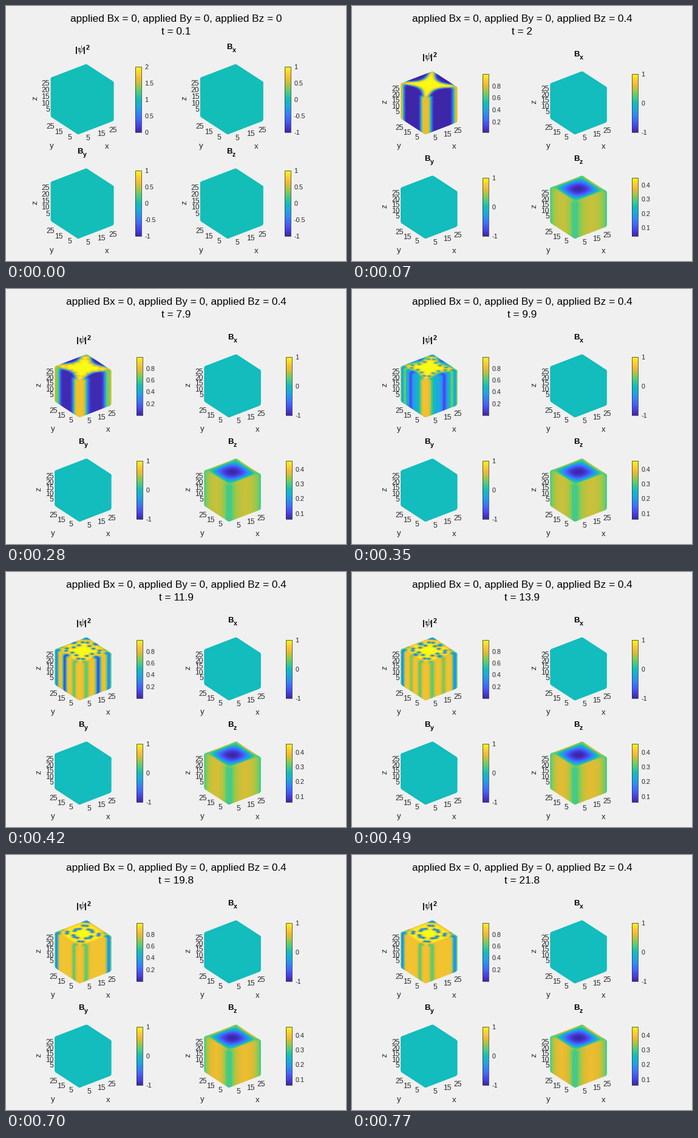
Write a matplotlib script that moves like this. It is 560x420 px and loops after 0.84 s.

```python
import numpy as np
import matplotlib.pyplot as plt
from matplotlib.animation import FuncAnimation
from matplotlib.colors import LinearSegmentedColormap
from matplotlib.patches import Rectangle

W, H, DPI = 560, 420, 100
PX = 72 / DPI
FRAMES, STEP_MS, DT = 12, 70, 1.98
N = 29  # lattice steps along each cube edge
COL, ROW = 246.2, 171.7
DOT = 8
INK = "#262626"

# blue, cyan, green, gold, yellow at even steps
CMAP = LinearSegmentedColormap.from_list("cube", [
    (.242, .150, .660), (.279, .263, .897), (.264, .403, .993),
    (.177, .548, .954), (.108, .667, .873), (.070, .746, .726),
    (.282, .796, .526), (.567, .794, .300), (.918, .731, .190),
    (.991, .806, .193), (.977, .984, .081)])

# the three visible faces of the cube, far points first
u, v = (g.ravel() for g in np.meshgrid(np.arange(N + 1.), np.arange(N + 1.)))
X = np.r_[0 * u, u, u]
Y = np.r_[u, 0 * u, v]
Z = np.r_[v, v, 0 * u + N]

# view axes for azimuth -37.5 and elevation 30 degrees
CA, SA = np.cos(np.radians(37.5)), np.sin(np.radians(37.5))
CE, SE = np.cos(np.radians(30)), np.sin(np.radians(30))
order = np.argsort(SE * Z - CE * (SA * X + CA * Y), kind="stable")
X, Y, Z = X[order], Y[order], Z[order]
VIEW_X = CA * X - SA * Y
VIEW_Y = SE * (SA * X + CA * Y) + CE * Z

# position along each edge and depth from it
SIDES = [(Y, X), (X, Y), (Y, N - X), (X, N - Y)]
NEAR_X, NEAR_Y = np.minimum(X, N - X), np.minimum(Y, N - Y)
EDGE, CORNER = np.minimum(NEAR_X, NEAR_Y), np.hypot(NEAR_X, NEAR_Y)


def ramp(t, a, b):
    f = np.clip((t - a) / (b - a), 0, 1)
    return f * f * (3 - 2 * f)


def vortices(t):
    """Place along the edge, depth, strength and spread of each vortex."""
    drift = .75 + .25 * ramp(t, 8, 17)
    for s in np.linspace(.23, .77, 4):
        yield s, drift * (2.5 + 5 * np.sin(np.pi * s) ** 2), .93 * ramp(t, 6.5, 11.5), 2.2
    late = ramp(t, 6, 11.5)
    yield .16, 0, .28 * late, 5
    yield .57 - .07 * ramp(t, 12, 17), 6 * ramp(t, 11.5, 17), .9 * late, 5 - 2.5 * ramp(t, 12, 17)
    yield .93, 0, .7 * late, 4


def density(t):
    """Superconducting density: edge lenses that break into vortices."""
    psi = 1 - .16 * np.exp(-EDGE / 1.5)
    lens = 1 - ramp(t, 8, 12)
    offset = 3 + 1.9 * ramp(t, 4, 9)
    for along, depth in SIDES:
        reach = 8.3 * np.sin(np.pi * along / N) - offset
        psi *= 1 - lens * .5 * (1 + np.tanh((reach - depth) / 1.5))
        for s, n, power, spread in vortices(t):
            r2 = (along - N * s) ** 2 + (depth - n) ** 2
            psi *= 1 - power * np.exp(-r2 / spread)
    return np.clip(psi, .02, 1)


def field_z(t):
    """Screened field on a 0..1 colour scale, weaker at the corners."""
    lam = .19
    c0 = 1 / np.cosh(.5 / lam)
    cx, cy = (np.cosh((q / N - .5) / lam) * c0 for q in (X, Y))
    low = 2 * c0 - c0 * c0
    shape = (cx + cy - cx * cy - low) / (1 - low)
    top = .765 + .05 * ramp(t, 8, 18)
    return shape * (top - (top - .59) * np.exp(-CORNER / 4))


def put(x, y, text, size, ha="left", rise=.358, **kw):
    """Text whose capitals are centred on y."""
    style = dict(color=INK, family="Liberation Sans") | kw
    ax.text(x, y + rise * size, text, fontsize=size * PX, ha=ha,
            va="baseline", **style)


def cube(x, y, s, level):
    ax.scatter(x + s * VIEW_X, y - s * VIEW_Y, s=(DOT * PX) ** 2,
               c=CMAP(level), linewidths=0)


def rulers(x, y, s):
    left = x - SA * N * s
    for n in range(5, 30, 5):
        put(left - 5.5, y - (11.2 + .908 * n) * s, n, 12, "right")
    for i in range(3):
        n = 5 + 10 * i
        put(x - 10.8 - 6.15 * s * i, y + 8.2 - 3.7 * s * i, n, 12, "right")
        put(x + 12 + 8.1 * s * i, y + 9.6 - 2.8 * s * i, n, 12)
    ax.text(left - 29.5, y - 23.6 * s, "z", fontsize=13.2 * PX, rotation=90,
            color=INK, family="Liberation Sans", ha="center", va="center")
    put(x - 43.7, y + 24.3, "y", 13.2, "center", rise=.2)
    put(x + 47, y + 24.6, "x", 13.2, "center", rise=.26)


def colorbar(x, y, s, lo, hi, step):
    x0, y0 = np.floor(x + 94.4), np.floor(y + .8 - 45.7 * s)
    x1, y1 = x0 + 10, np.floor(y + .8)
    ax.imshow(np.linspace(0, 1, 256)[:, None], cmap=CMAP, origin="lower",
              extent=(x0, x1, y1, y0), aspect="auto")
    ax.add_patch(Rectangle((x0, y0), x1 - x0, y1 - y0, fill=False,
                           ec=INK, lw=.7 * PX))
    first, last = int(np.ceil(lo / step)), int(np.floor(hi / step))
    for i in range(first, last + 1):
        tick = y1 - (i * step - lo) / (hi - lo) * (y1 - y0)
        put(x1 + 5.5, tick, f"{i * step:g}", 10.8)


def heading(x, y, s, name):
    bold = dict(weight="bold", color="black")
    x, y = x + 5.5, y - 45.45 * s - 33.4
    if name == "psi":
        x, y = x - 10.8, y + 5
        put(x, y, "|", 13.2, **bold)
        for shift in (3, 3.4):
            put(x + shift, y, r"$\psi$", 14.5, rise=.33, color="black",
                math_fontfamily="cm")
        put(x + 13, y, "|", 13.2, **bold)
        put(x + 17.5, y - 3.4, "2", 10.6, **bold)
    else:
        put(x - 7.7, y, "B", 13.2, **bold)
        put(x + 1.9, y + 6, name, 10.6, **bold)


def panels(t, started):
    """Name, colour level and colour bar (low, high, step) of each plot."""
    if not started:
        flat = np.full(X.size, .5)
        return [("psi", flat, (0, 2, .5))] + [(n, flat, (-1, 1, .5)) for n in "xyz"]
    flat = np.full(X.size, .49)
    settle = np.exp(-t / 1.5)
    lo = .1 * settle
    psi = (density(t) - lo) / (1 - lo)
    return [("psi", psi, (lo, .999, .2)),
            ("x", flat, (-1, 1, 1)), ("y", flat, (-1, 1, 1)),
            ("z", field_z(t), (.063 - .08 * settle, .4565 - .025 * settle, .1))]


def draw(k):
    ax.cla()
    ax.axis("off")
    t = max(.1, round(DT * k, 1))
    applied = .4 if k else 0
    put(280, 19.4, f"applied Bx = 0, applied By = 0, applied Bz = {applied:g}",
        17.3, "center", color="black")
    put(280, 41.2, f"t = {t:g}", 17.3, "center", color="black")

    # wider tick labels leave less room once the field is on
    s = 2.1 if k else 2.36
    foot = 137.4 - 7.7 * s
    for i, (name, level, scale) in enumerate(panels(t, k > 0)):
        at = foot + i % 2 * COL, 207.2 + i // 2 * ROW, s
        cube(*at, level)
        rulers(*at)
        colorbar(*at, *scale)
        heading(*at, name)
    ax.set_xlim(0, W)
    ax.set_ylim(H, 0)


fig = plt.figure(figsize=(W / DPI, H / DPI), dpi=DPI, facecolor="#f0f0f0")
ax = fig.add_axes([0, 0, 1, 1])
anim = FuncAnimation(fig, draw, frames=FRAMES, interval=STEP_MS, repeat=True)
plt.show()
```
